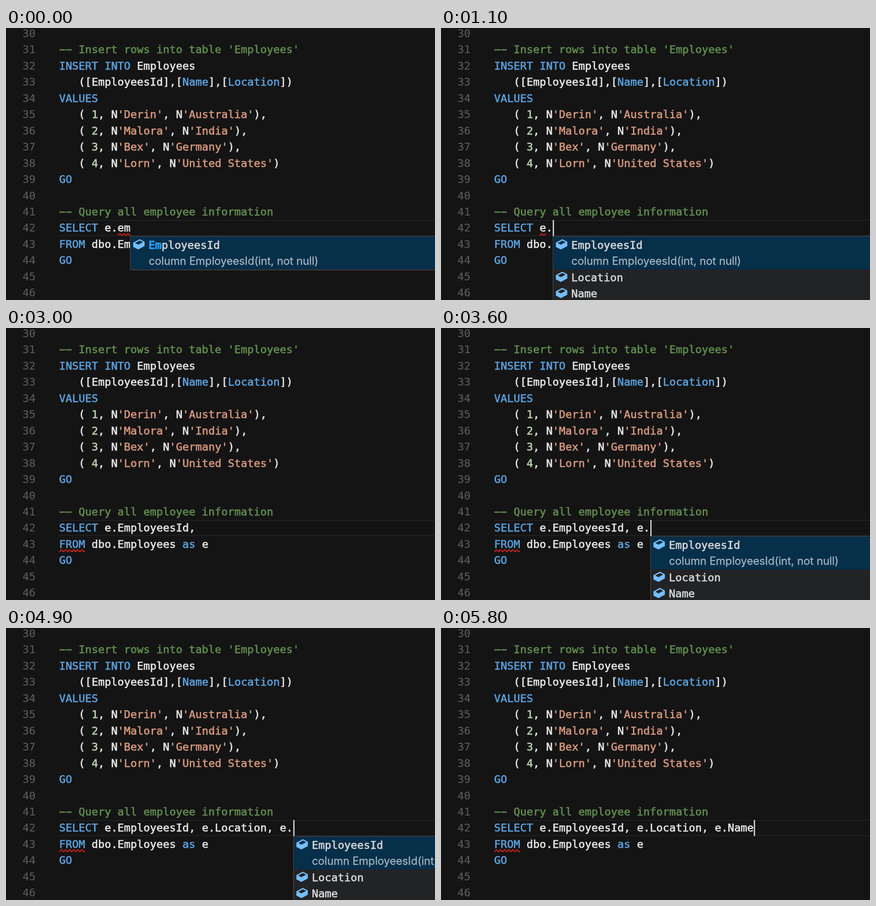
An HTML page with a canvas that plays this animation: 941x595 px, repeating every 6.3 s.

```html
<!DOCTYPE html>
<html>
<head>
<meta charset="utf-8">
<style>
html, body { margin: 0; width: 100%; height: 100%; overflow: hidden; background: #141414; }
canvas { display: block; }
</style>
</head>
<body>
<canvas id="stage" width="941" height="595"></canvas>
<script>
const ctx = document.getElementById('stage').getContext('2d');
const LOOP = 6300, LEFT = 116.5, CHAR = 14.237, PITCH = 35.47;
const MONO = '23.65px "DejaVu Sans Mono", monospace';
const SANS = '23.7px Inter, sans-serif';
const COLOR = {
  plain: '#e4e4e4', comment: '#608b4e', string: '#d4967c', keyword: '#5ba0dc',
  number: '#b8d2aa', gutter: '#5a5a5a', item: '#d6d6d6', match: '#2f9cf0', detail: '#a9b7c2'
};
const CODE = [
  '', "-- Insert rows into table 'Employees'", 'INSERT INTO Employees',
  '   ([EmployeesId],[Name],[Location])', 'VALUES',
  "   ( 1, N'Derin', N'Australia'),", "   ( 2, N'Malora', N'India'),",
  "   ( 3, N'Bex', N'Germany'),", "   ( 4, N'Lorn', N'United States')",
  'GO', '', '-- Query all employee information', '', 'FROM dbo.Employees as e', 'GO', '', ''
];
const COLUMNS = ['EmployeesId', 'Location', 'Name'];
const TYPES = { EmployeesId: 'int', Location: 'nvarchar', Name: 'nvarchar' };
const TOKENS = /(--.*)|('[^']*')|(\b(?:INSERT|INTO|VALUES|GO|SELECT|FROM|as)\b|(?<=\[)(?:Name|Location)(?=\]))|(\b\d+\b)/g;
const KINDS = ['comment', 'string', 'keyword', 'number'];

// Each step: start time, typed text, popup (null, '' for all columns, or the matched prefix)
const FIRST = 'e.EmployeesId', SECOND = FIRST + ', e.Location';
const STEPS = [
  [0, 'e.em', 'Em'],
  [300, 'e.e', null],
  [400, 'e.', null],
  [500, 'e', null],
  [600, 'e.', ''],
  [1700, 'e.E', 'E'],
  [1900, 'e.Em', 'Em'],
  [2100, 'e.Emp', 'Emp'],
  [2300, FIRST, null],
  [2500, FIRST + ',', null],
  [3100, FIRST + ', ', null],
  [3200, FIRST + ', e', null],
  [3400, FIRST + ', e.', ''],
  [3700, FIRST + ', e.L', 'L'],
  [3800, FIRST + ', e.Lo', 'Lo'],
  [4000, SECOND, null],
  [4300, SECOND + ',', null],
  [4500, SECOND + ', ', null],
  [4600, SECOND + ', e', null],
  [4800, SECOND + ', e.', ''],
  [5300, SECOND + ', e.N', 'N'],
  [5500, SECOND + ', e.Na', 'Na'],
  [5700, SECOND + ', e.Name', null]
];

const columnX = col => LEFT + col * CHAR;
const rowY = line => 46.8 + (line - 31) * PITCH;

function label(text, x, middle, color, font = MONO, weight = 0.75) {
  ctx.font = font;
  ctx.fillStyle = ctx.strokeStyle = color;
  ctx.lineJoin = 'round';
  ctx.lineWidth = weight;
  ctx.fillText(text, x, middle + 8.5);
  ctx.strokeText(text, x, middle + 8.5);
}

function codeLine(text, line) {
  const put = (from, to, kind) => {
    // The minus glyph gives the wide dashes of the editor font.
    const shown = text.slice(from, to).replace('--', '\u2212\u2212');
    if (shown) label(shown, columnX(from), rowY(line), COLOR[kind]);
  };
  let end = 0;
  for (const found of text.matchAll(TOKENS)) {
    put(end, found.index, 'plain');
    end = found.index + found[0].length;
    put(found.index, end, KINDS[found.slice(1).findIndex(Boolean)]);
  }
  put(end, text.length, 'plain');
}

function squiggle(col, count, line) {
  const x0 = columnX(col) + 0.5, y0 = rowY(line) + 14.8;
  ctx.beginPath();
  for (let x = 0; x <= count * CHAR; x++) {
    ctx.lineTo(x0 + x, y0 + 2 * Math.cos(x * Math.PI / 4.5));
  }
  ctx.strokeStyle = '#e32218';
  ctx.lineWidth = 2;
  ctx.stroke();
}

function polygon(x, y, points, color) {
  ctx.beginPath();
  points.forEach(([px, py]) => ctx.lineTo(x + px, y + py));
  ctx.closePath();
  ctx.fillStyle = color;
  ctx.fill();
}

function boxIcon(x, y, hollow) {
  polygon(x, y, [[0, 7.5], [14, 0], [25, 5.5], [25, 15], [11, 22.5], [0, 17]], '#75beff');
  polygon(x, y, [[4, 8.5], [14, 3], [21.5, 6.5], [11, 12]], hollow);
}

function popup(x, prefix) {
  const items = COLUMNS.filter(name => name.startsWith(prefix));
  const bottom = items.length > 1 ? 600 : 529;
  ctx.fillStyle = '#454545';
  ctx.fillRect(x, 455, 941 - x, bottom - 454);
  ctx.fillStyle = '#222325';
  ctx.fillRect(x + 1.5, 456.5, 941 - x, bottom - 457);
  ctx.fillStyle = '#062f4a';
  ctx.fillRect(x + 1.5, 456.5, 941 - x, 71.5);
  items.forEach((name, i) => {
    const middle = 474 + (i ? i + 1 : 0) * 35.5;
    boxIcon(x + 7, middle - 12, i ? '#222325' : '#062f4a');
    const split = prefix.length, textX = x + 40.7;
    label(name.slice(split), textX + split * CHAR, middle, COLOR.item);
    label(prefix, textX, middle, COLOR.match, MONO, 1.5);
  });
  label(`column ${items[0]}(${TYPES[items[0]]}, not null)`, x + 41, 509.8, COLOR.detail, SANS, 0.3);
}

function draw(time) {
  const [start, typed, prefix] = STEPS.findLast(step => step[0] <= time);
  const query = 'SELECT ' + typed;
  ctx.fillStyle = '#141414';
  ctx.fillRect(0, 0, 941, 595);
  ctx.fillStyle = '#212121';
  ctx.fillRect(116, 420, 825, 2);
  ctx.fillRect(116, 453, 825, 2);

  CODE.forEach((text, i) => {
    label(String(30 + i), 36.3, rowY(30 + i), COLOR.gutter, MONO, 0.2);
    codeLine(i === 12 ? query : text, 30 + i);
  });

  if (time < 400) squiggle(9, typed.length - 2, 42);
  else if (time >= 800 && time < 1700) squiggle(7, 1, 42);
  else if (time >= 1800) squiggle(0, 4, 43);

  const caret = columnX(query.length) + 0.5;
  if (prefix !== null) {
    const shift = time < 300 ? 2 : prefix ? 11.5 : 0;
    popup(Math.round(caret - shift), prefix);
  }
  const blinkOn = time >= 5700 || Math.floor((time - start) / 500) % 2 === 0;
  const visible = time >= 100 && (blinkOn || (time >= 1100 && time < 1200));
  if (visible) {
    ctx.fillStyle = '#c4c4c4';
    ctx.fillRect(Math.round(caret), 420, 3, 35);
  }
}

function tick(now) {
  draw(now % LOOP);
  requestAnimationFrame(tick);
}
draw(0);
requestAnimationFrame(tick);
</script>
</body>
</html>
```
